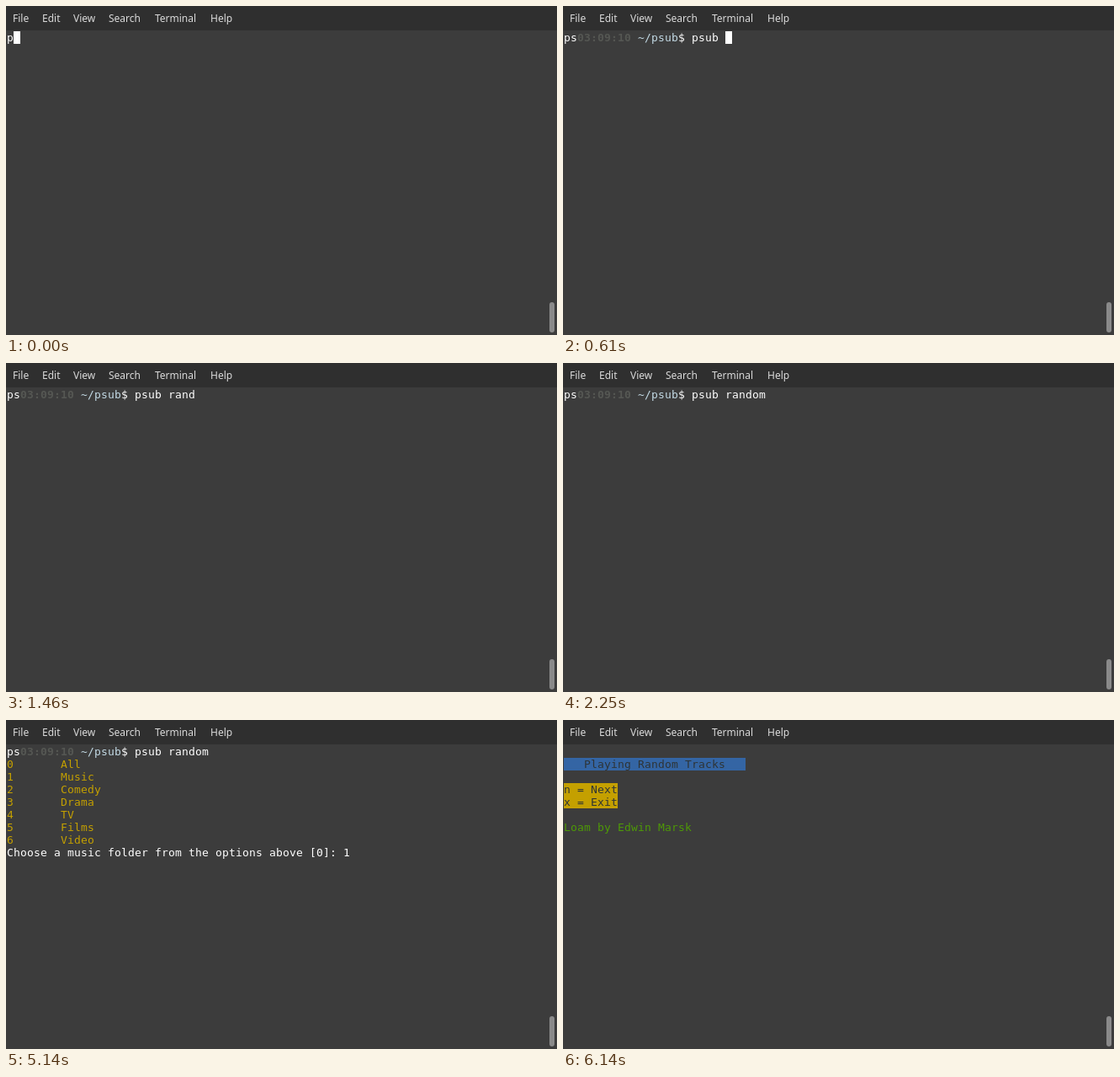
Write an HTML page with a canvas that moves like this. It is 655 px wide and 391 px high and loops after 8 s.

```html
<!DOCTYPE html>
<html lang="en">
<head>
<meta charset="utf-8">
<title>Terminal session</title>
<style>
  html, body { margin: 0; width: 100%; height: 100%; overflow: hidden; background: #3c3c3c; }
  canvas { display: block; width: 655px; height: 391px; }
</style>
</head>
<body>
<canvas id="stage" width="655" height="391"></canvas>
<script>
const ctx = document.getElementById('stage').getContext('2d', { alpha: false });
const LOOP = 8000;
const CELL_W = 8, CELL_H = 15, LEFT = 1, TOP = 30, ASCENT = 12;
const MONO = '13px "DejaVu Sans Mono", monospace';
const WHITE = '#ffffff', YELLOW = '#c4a000', BLUE = '#3465a4',
      GREEN = '#4e9a06', DARK = '#2e3436', GREY = '#555753', PATH = '#c4dbe6';

const MENU = [['File', 8], ['Edit', 43], ['View', 80], ['Search', 122], ['Terminal', 177], ['Help', 243]];
const FOLDERS = ['All', 'Music', 'Comedy', 'Drama', 'TV', 'Films', 'Video'];

// [start time, characters typed after the prompt, cursor visible]
const TYPING = [
  [270, 2, true], [330, 3, true], [550, 4, true], [610, 5, true], [910, 6, true],
  [1120, 7, true], [1250, 8, true], [1460, 9, false], [1650, 10, false], [1710, 11, false]
];
const COMMAND = 'psub random';
const PROMPT_END = 19;

function fillCells(col, row, count, color) {
  ctx.fillStyle = color;
  ctx.fillRect(LEFT + col * CELL_W, TOP + row * CELL_H, count * CELL_W, CELL_H);
}

function print(text, col, row, color, bold) {
  ctx.font = (bold ? 'bold ' : '') + MONO;
  ctx.fillStyle = color;
  [...text].forEach((ch, i) => {
    if (ch !== ' ') ctx.fillText(ch, LEFT + (col + i) * CELL_W, TOP + row * CELL_H + ASCENT);
  });
}

function printOn(text, row, background) {
  fillCells(0, row, text.length, background);
  print(text, 0, row, DARK);
}

function drawWindow() {
  ctx.fillStyle = '#3c3c3c';
  ctx.fillRect(0, 0, 655, 391);
  ctx.fillStyle = '#2f2f2f';
  ctx.fillRect(0, 0, 655, 29);
  ctx.font = '12px "Noto Sans", sans-serif';
  ctx.fillStyle = '#dadada';
  for (const [label, x] of MENU) ctx.fillText(label, x, 19);
  ctx.fillStyle = '#8a8a8a';
  ctx.beginPath();
  ctx.roundRect(646, 352, 6, 36, 3);
  ctx.fill();
}

function drawCommand(t) {
  print(t < 210 ? 'p' : 'ps', 0, 0, WHITE);
  const step = TYPING.filter(([start]) => t >= start).pop();
  if (!step) {
    fillCells(t < 210 ? 1 : 2, 0, 1, WHITE);
    return;
  }
  const [, count, cursor] = step;
  print('03:09:10', 2, 0, GREY, true);
  print('~/psub', 11, 0, PATH);
  print('$', 17, 0, WHITE);
  print(COMMAND.slice(0, count), PROMPT_END, 0, WHITE);
  if (cursor) fillCells(PROMPT_END + count, 0, 1, WHITE);
}

function drawFolders(t) {
  const shown = t < 2890 ? 0 : t < 2990 ? 1 : t < 5140 ? 2 : FOLDERS.length;
  FOLDERS.slice(0, shown).forEach((name, i) => {
    print(String(i), 0, i + 1, YELLOW);
    print(name, 8, i + 1, YELLOW);
  });
  if (t >= 5140) print('Choose a music folder from the options above [0]: 1', 0, 8, WHITE);
}

function drawPlayer() {
  printOn('   Playing Random Tracks   ', 1, BLUE);
  printOn('n = Next', 3, YELLOW);
  printOn('x = Exit', 4, YELLOW);
  print('Loam by Edwin Marsk', 0, 6, GREEN);
}

function frame(now) {
  const t = now % LOOP;
  drawWindow();
  if (t < 6140) {
    drawCommand(t);
    drawFolders(t);
  } else {
    drawPlayer();
  }
  requestAnimationFrame(() => frame(performance.now() - origin));
}

const origin = performance.now();
frame(0);
</script>
</body>
</html>
```
